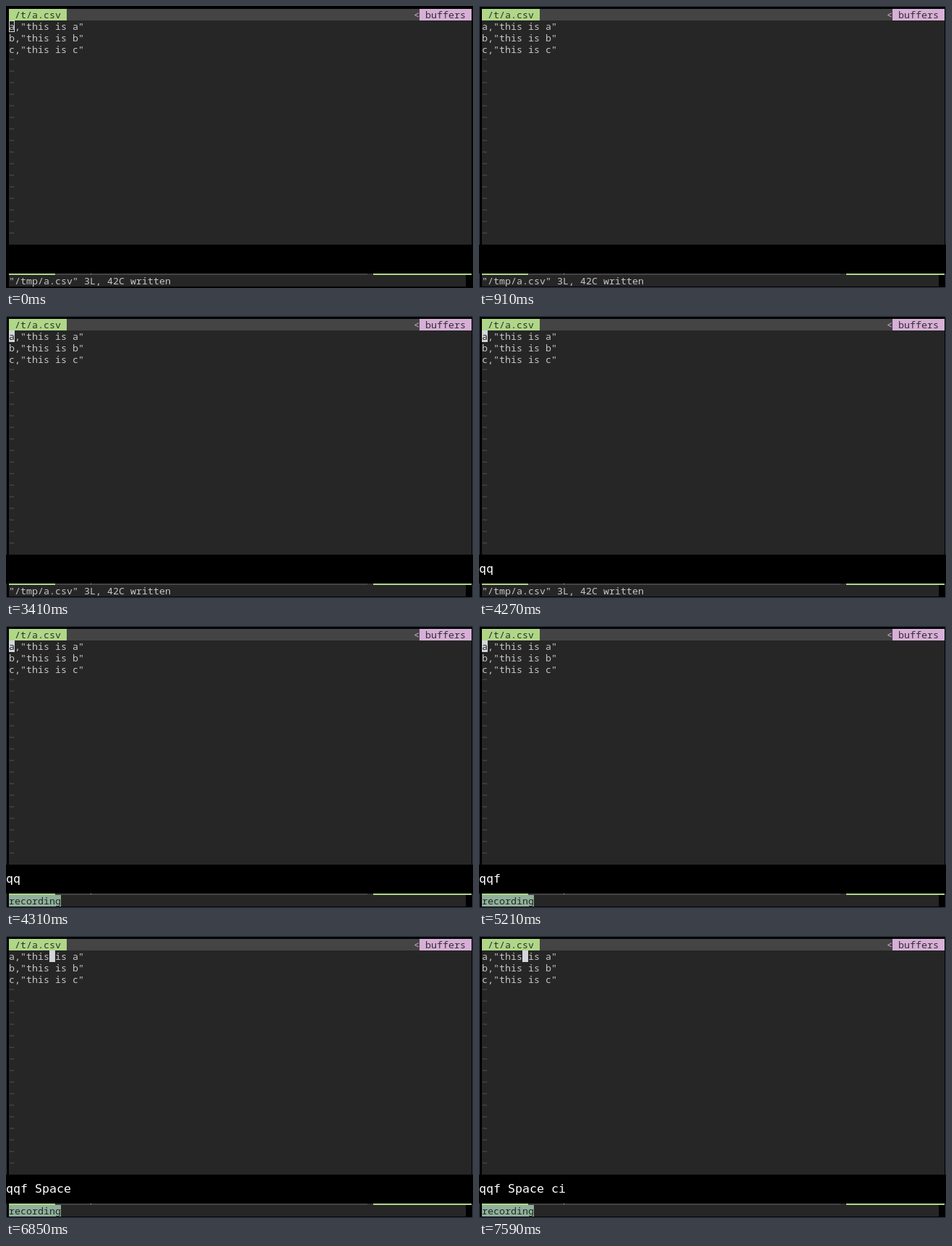
Animation, 646 px wide and 390 px high, one loop 8000 ms. Source, as an HTML page with a canvas:

```html
<!DOCTYPE html>
<html lang="en">
<head>
<meta charset="utf-8">
<title>Terminal recording</title>
<style>
  html, body { margin: 0; width: 100%; height: 100%; overflow: hidden; background: #000; }
  canvas { display: block; }
</style>
</head>
<body>
<canvas id="stage" width="646" height="390"></canvas>
<script>
const ctx = document.getElementById('stage').getContext('2d');
const LOOP = 8000, LEFT = 4, TOP = 4, CELL_W = 8, CELL_H = 16;
const TERM_FONT = '13.33px "Noto Sans Mono", monospace';
const KEY_FONT = '16.6px "DejaVu Sans Mono", monospace';
const C = {
  bg: '#262626', bar: '#444444', dark: '#303030', text: '#c6c6c6', dim: '#585858',
  green: '#afd787', pink: '#d7afd7', cursor: '#d3d7dc', rec: '#8fb09a', border: '#2e3a4c'
};
const LINES = ['a', 'b', 'c'].map(k => `${k},"this is ${k}"`);

// [time, state] pairs; the latest one reached applies
const KEYS = [[0, ''], [3960, 'q'], [4270, 'qq'], [5170, 'qqf'], [5850, 'qqf Space'],
  [7220, 'qqf Space c'], [7590, 'qqf Space ci']];
const CURSOR = [[0, 'hollow'], [440, 'on'], [910, ''], [1410, 'on'], [1910, ''], [2410, 'on'],
  [2910, ''], [3410, 'on'], [3910, ''], [4000, 'on'], [4770, ''], [5210, 'on'],
  [5670, ''], [5890, 'on'], [6350, ''], [6850, 'on']];
const FOCUS_AT = 400, RECORD_AT = 4310, JUMP_AT = 5890;

const at = (track, t) => track.filter(([start]) => start <= t).pop()[1];

function box(x, y, w, h, color) {
  ctx.fillStyle = color;
  ctx.fillRect(x, y, w, h);
}

function grid(str, x, baseline, step, font, color) {
  ctx.font = font;
  ctx.fillStyle = color;
  [...str].forEach((ch, i) => ctx.fillText(ch, x + i * step, baseline));
}

function term(str, col, row, color = C.text, lift = 0) {
  grid(str, LEFT + col * CELL_W, TOP + row * CELL_H + 13 - lift, CELL_W, TERM_FONT, color);
}

function drawTabs() {
  box(4, 4, 640, 16, C.bar);
  box(4, 4, 80, 16, C.green);
  box(572, 4, 72, 16, C.pink);
  term('/t/a.csv', 1, 0, C.dark);
  term('<', 70, 0, C.pink);
  term('buffers', 72, 0, C.dark);
}

function drawCursor(t) {
  const mode = at(CURSOR, t);
  const col = t < JUMP_AT ? 0 : 7;
  const x = LEFT + col * CELL_W, y = TOP + CELL_H;
  if (mode === 'on') {
    box(x, y, CELL_W, CELL_H, C.cursor);
    term(LINES[0][col], col, 1, C.bg);
  } else if (mode === 'hollow') {
    ctx.strokeStyle = C.cursor;
    ctx.lineWidth = 1;
    ctx.strokeRect(x + 0.5, y + 0.5, CELL_W - 1, CELL_H - 1);
  }
}

function drawStatus(t) {
  box(4, 370, 640, 2, C.dark);
  box(68, 370, 432, 2, C.bar);
  box(4, 370, 64, 2, C.green);
  box(508, 370, 136, 2, C.green);
  box(117, 370, 1, 1, C.text);
  box(4, 372, 632, 16, C.bg);
  if (t < RECORD_AT) {
    term('"/tmp/a.csv" 3L, 42C written', 0, 23);
  } else {
    box(4, 372, 72, 16, C.rec);
    term('recording', 0, 23, C.bg);
  }
}

function draw(t) {
  box(0, 0, 646, 390, '#000');
  if (t >= FOCUS_AT) {
    ctx.strokeStyle = C.border;
    ctx.lineWidth = 1;
    ctx.strokeRect(0.5, 0.5, 645, 389);
  }
  box(4, 20, 640, 310, C.bg);
  drawTabs();
  LINES.forEach((line, i) => term(line, 0, i + 1));
  for (let row = 4; row < 20; row++) term('~', 0, row, C.dim, 2);
  drawCursor(t);
  box(0, 330, 646, 40, '#000');
  drawStatus(t);
  grid(at(KEYS, t), 0, 355, 10, KEY_FONT, '#fff');
}

const start = performance.now();
function tick() {
  draw((performance.now() - start) % LOOP);
  requestAnimationFrame(tick);
}
tick();
</script>
</body>
</html>
```
